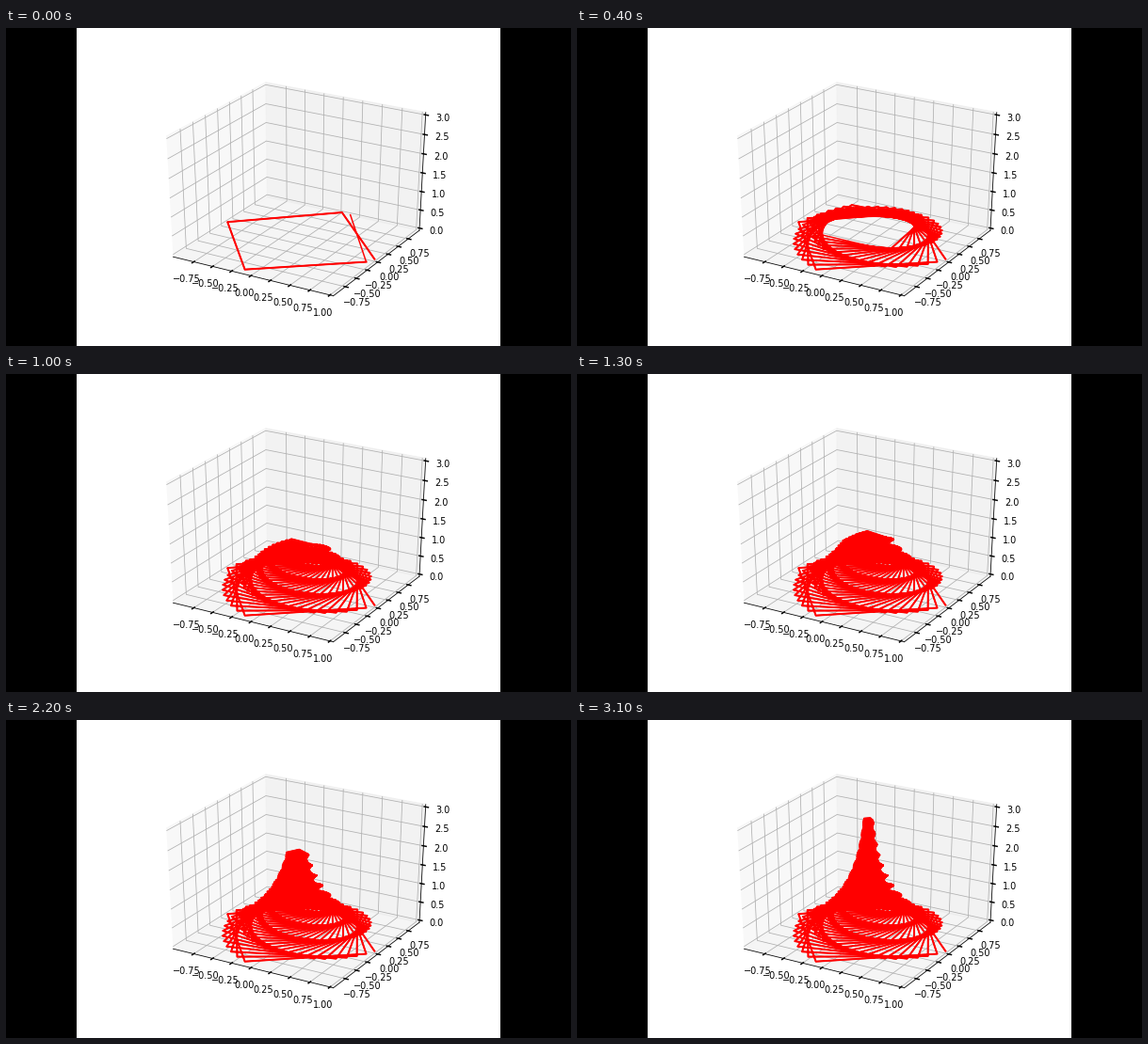
Write a matplotlib script that moves like this. It is 600 by 338 pixels and loops after 3.2 s.

```python
import numpy as np
import matplotlib.pyplot as plt
from matplotlib.animation import FuncAnimation
from matplotlib.patches import Rectangle

W, H, DPI = 600, 338, 64
SCALE = 450 / 640                # 640x480 plot shown 450 px wide
K = 100 * SCALE / DPI            # point sizes at this dpi
FRAMES, STEP_MS = 32, 100
POINTS, START = 500, 6

plt.rcParams.update({
    "font.family": "DejaVu Sans",
    "font.size": 10 * K,
    "axes.linewidth": 0.8 * K,
    "grid.linewidth": 0.8 * K,
    "patch.linewidth": K,
    "xtick.major.width": 1.5 * K,
    "ytick.major.width": 1.5 * K,
    # keeps the label distance (pad + 8 pt) in pixels
    "xtick.major.pad": 11.5 * K - 8,
    "ytick.major.pad": 11.5 * K - 8,
})

# Shrinking spiral, sampled so coarsely that it looks like turning squares
z = np.linspace(0, 3, POINTS)
theta = np.linspace(0, 244 * np.pi, POINTS)
x = np.exp(-z) * np.cos(theta)
y = np.exp(-z) * np.sin(theta)


def padded(values):
    lo, hi = values.min(), values.max()
    pad = (hi - lo) / 48
    return lo - pad, hi + pad


fig = plt.figure(figsize=(W / DPI, H / DPI), dpi=DPI, facecolor="black")
fig.add_artist(Rectangle((75 / W, 0), 450 / W, 1, facecolor="white",
                         edgecolor="none", linewidth=0, zorder=-1,
                         transform=fig.transFigure))

left = 75 + 80 * SCALE
bottom = 52.8 * SCALE + 0.25
ax = fig.add_axes((left / W, bottom / H, 496 * SCALE / W, 369.6 * SCALE / H),
                  projection="3d")
ax.apply_aspect = lambda position=None: None    # let the cube fill the wide box
ax.set_box_aspect((1, 1, 1), zoom=np.sqrt(3) / 1.8294640721620434)
ax.view_init(elev=30, azim=-60)

# Overdrawn older strokes look heavier than the newest one
heavy, = ax.plot(x, y, z, color="red", linewidth=2.0 * K)
light, = ax.plot(x, y, z, color="red", linewidth=1.5 * K)

ax.set_xticks(np.arange(-0.75, 1.01, 0.25))
ax.set_yticks(np.arange(-0.75, 0.76, 0.25))
ax.set_zticks(np.arange(0, 3.01, 0.5))
ax.set_xlim(*padded(x))
ax.set_ylim(*padded(y))
ax.set_zlim(*padded(z))


def show(line, n):
    line.set_data_3d(x[:n], y[:n], z[:n])


def update(frame):
    n = round(START + (POINTS - START) * frame / (FRAMES - 1))
    show(heavy, n - 1)
    show(light, n)
    return heavy, light


anim = FuncAnimation(fig, update, frames=FRAMES, interval=STEP_MS,
                     init_func=lambda: update(0), repeat=True, repeat_delay=0)
plt.show()
```
